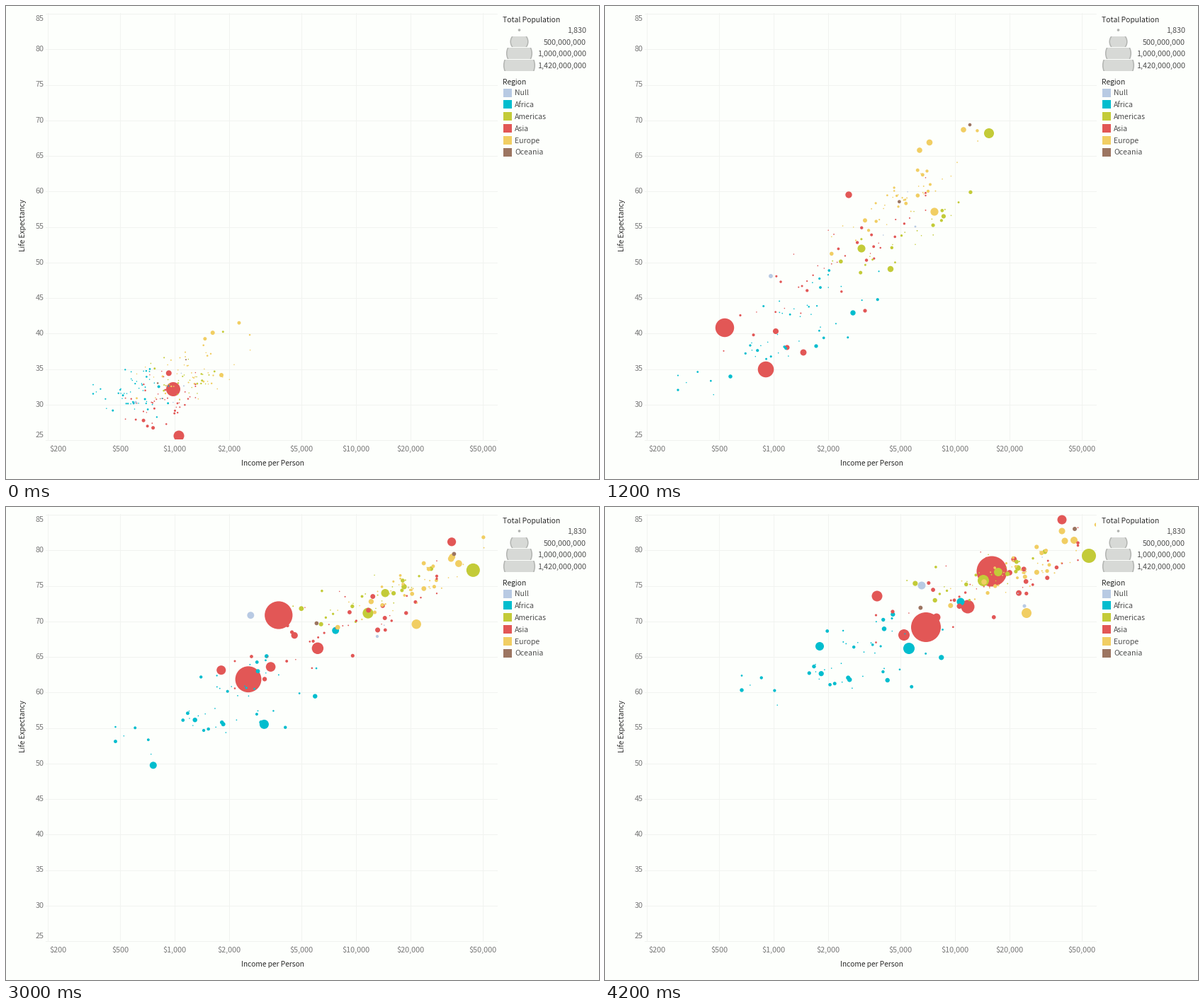
Recreate the animation shown at these times as a matplotlib script. Size 837 by 669 pixels, loop 4800 ms.

```python
import numpy as np
import matplotlib.pyplot as plt
from matplotlib.animation import FuncAnimation
from matplotlib.patches import Circle, Rectangle

W, H, DPI = 837, 669, 72          # at 72 dpi one point is one pixel
LEFT, TOP, RIGHT, BOTTOM = 60, 10, 693, 613
FONT = "Noto Sans CJK JP"
PAPER, GRID = "#fdfffc", "#f1f3f0"
TICK, LABEL, TITLE = "#787878", "#505050", "#2b2b2b"

# Every path has four key poses: start, take-off, catch-up and end.
SLOPE = np.array([-0.2, -0.65, -0.45, -0.36])
SLOW, FAST = np.array([0, 0.28, 0.74, 1]), np.array([0, 0.65, 0.9, 1])


class Region:
    """A drifting cloud of seeded dots led by a few large bubbles.

    A leader is (first diameter, last diameter, pace, *latest key points).
    """

    def __init__(self, color, growth, early, count, spread, rise, centres, leaders):
        self.color, self.growth, self.early = color, growth, early
        self.count, self.leaders = count, leaders
        self.centres = np.array(centres, float)
        self.spread = np.array([spread[0]] + [spread[1]] * 3, float)
        self.rise = np.array([rise[0]] + [rise[1]] * 3, float)

    def lead(self, points):
        """Start from the matching place in the first cloud if none is given."""
        if len(points) == 3:
            scale = self.spread[0] / self.spread[1]
            first = self.centres[0] + scale * (points[0] - self.centres[1])
            points = [first, *points]
        return np.array(points, float)

    def scatter(self, rng):
        u, v = np.clip(rng.normal(size=2), -1.9, 1.9)
        dx = self.spread * u
        return self.centres + np.column_stack([dx, SLOPE * dx + self.rise * v])

    def bubbles(self, rng):
        """Yield key places, key diameters and pace."""
        for first, last, pace, *points in self.leaders:
            yield self.lead(points), first + (last - first) * self.growth, pace
        for _ in range(self.count):
            last = 1.5 + 6.5 * rng.random() ** 2.2
            first = 1.1 + 0.25 * last
            yield self.scatter(rng), first + (last - first) * self.growth, 0.3


REGIONS = {
    "Null": Region(
        "#b8cae3", SLOW, 0.4, 2, (20, 60), (20, 20),
        [(215, 550), (330, 350), (450, 200), (520, 130)],
        [(4, 11, 0.38, (234, 382), (283, 179), (447, 111)),
         (2, 5, 0.0, (438, 312), (524, 183), (592, 140))]),
    "Africa": Region(
        "#00bdce", SLOW, 0.38, 48, (30, 80), (20, 32),
        [(180, 550), (255, 465), (290, 315), (345, 225)],
        [(4, 16, 0.05, (350, 434), (361, 313), (429, 200)),
         (3, 12, 0.15, (177, 524), (191, 395), (303, 197)),
         (3, 11, 0.45, (298, 481), (435, 208), (502, 134))]),
    "Americas": Region(
        "#c3cb38", FAST, 0.58, 26, (24, 52), (20, 20),
        [(250, 530), (420, 330), (495, 145), (525, 102)],
        [(3, 20, 0.45, (542, 180), (640, 106), (683, 69)),
         (2, 16, 0.36, (362, 343), (498, 176), (534, 104)),
         (2, 12, 0.45, (403, 372), (519, 146), (555, 92))]),
    "Asia": Region(
        "#e25756", SLOW, 0.38, 42, (26, 75), (20, 26),
        [(218, 555), (310, 370), (440, 195), (525, 115)],
        [(20, 43, 0.38, (236, 542), (169, 455), (286, 191), (546, 91)),
         (15, 42, 0.27, (244, 608), (227, 514), (301, 271), (453, 170)),
         (5, 19, 0.30, (280, 490), (409, 225), (512, 141)),
         (5, 16, 0.18, (241, 460), (363, 236), (422, 181)),
         (4, 15, 0.32, (257, 483), (266, 280), (384, 126)),
         (8, 13, 0.41, (344, 267), (618, 71), (645, 18)),
         (3, 11, 0.20, (367, 431), (392, 188), (468, 156))]),
    "Europe": Region(
        "#f1ce63", FAST, 0.58, 44, (45, 58), (20, 14),
        [(270, 518), (430, 265), (570, 120), (598, 86)],
        [(6, 14, 0.25, (304, 522), (465, 291), (574, 171), (595, 150)),
         (6, 10, 0.45, (458, 193), (620, 107), (662, 47)),
         (5, 9, 0.45, (506, 175), (614, 89), (649, 48)),
         (5, 9, 0.30, (444, 204), (621, 90), (645, 34))]),
    "Oceania": Region(
        "#9c7561", FAST, 0.58, 1, (20, 50), (20, 20),
        [(220, 545), (430, 280), (450, 180), (460, 150)],
        [(2, 6, 0.40, (515, 168), (612, 90), (663, 31))]),
}


def build_bubbles():
    """Key poses (n, 4, xyd), positions between keys (n, 8) and colours."""
    rng = np.random.default_rng(12)
    poses, times, colors = [], [], []
    for region in REGIONS.values():
        for places, sizes, pace in region.bubbles(rng):
            poses.append(np.column_stack([places, sizes]))
            times.append([0, region.early, 1, 1.6, 2, 2 + pace, 2.47 + pace, 3])
            colors.append(region.color)
    return np.array(poses), np.array(times), np.array(colors)


POSES, TIMES, SHADES = build_bubbles()

fig = plt.figure(figsize=(W / DPI, H / DPI), dpi=DPI, facecolor=PAPER)
ax = fig.add_axes([0, 0, 1, 1])
ax.set_xlim(0, W)
ax.set_ylim(H, 0)
ax.axis("off")


def write(x, y, text, size=10.8, color=TICK, ha="left"):
    """Place text with its capitals centred on y."""
    ax.text(x, y + 0.37 * size, text, fontsize=size, color=color,
            family=FONT, ha=ha, va="baseline")


def draw_axes():
    for life in range(25, 90, 5):
        y = BOTTOM - (life - 25) * (BOTTOM - TOP) / 60
        ax.plot([LEFT - 4, RIGHT], [int(y + 0.5) + 0.5] * 2, color=GRID, lw=1)
        write(54, np.clip(y, 17, 606), str(life), ha="right")
    for income in (200, 500, 1000, 2000, 5000, 10000, 20000, 50000):
        x = 238 + 77 * np.log2(income / 1000)
        ax.plot([int(x + 0.5) + 0.5] * 2, [TOP, BOTTOM + 1], color=GRID, lw=1)
        write(max(x, 73), 626, f"${income:,}", ha="center")
    write(376.5, 646, "Income per Person", 10.2, TITLE, "center")
    ax.text(24, 310, "Life Expectancy", fontsize=10.2, color=TITLE, family=FONT,
            rotation=90, ha="center", va="center")


def draw_legend():
    write(701, 19, "Total Population", 10.3, TITLE)
    ax.add_patch(Circle((724.5, 34), 1.8, fc="#b0b2af", lw=0))
    rows = zip((34, 50.5, 67, 84), (0, 26, 37, 45),
               (1830, 500_000_000, 1_000_000_000, 1_420_000_000))
    for y, d, people in rows:
        write(819, y, f"{people:,}", 10.8, LABEL, "right")
        if d:
            disc = Circle((724.5, y), d / 2 - 0.7, fc="#d7d9d6", ec="#b2b4b1", lw=1.5)
            ax.add_patch(disc)
            disc.set_clip_path(Rectangle((700, y - 7.6), 49, 15.2,
                                         transform=ax.transData))
    write(701, 107.5, "Region", 10.3, TITLE)
    for i, (name, region) in enumerate(REGIONS.items()):
        y = 122.5 + 16.8 * i
        ax.add_patch(Rectangle((702, int(y - 5.5)), 12, 12, fc=region.color, lw=0))
        write(718, y, name, 10.5, LABEL)


draw_axes()
draw_legend()
dots = ax.scatter([], [], linewidths=0, zorder=5)
dots.set_clip_path(Rectangle((LEFT, TOP), RIGHT - LEFT, BOTTOM - TOP,
                             transform=ax.transData))


def update(step):
    t = TIMES[:, step]
    low = np.minimum(t.astype(int), 2)
    part = (t - low)[:, None]
    every = np.arange(len(t))
    pose = POSES[every, low] * (1 - part) + POSES[every, low + 1] * part
    order = np.argsort(-pose[:, 2], kind="stable")
    dots.set_offsets(pose[order, :2])
    dots.set_sizes(pose[order, 2] ** 2)
    dots.set_facecolor(SHADES[order])
    return (dots,)


anim = FuncAnimation(fig, update, frames=8, interval=600, repeat=True,
                     repeat_delay=0, blit=False)
plt.show()
```
